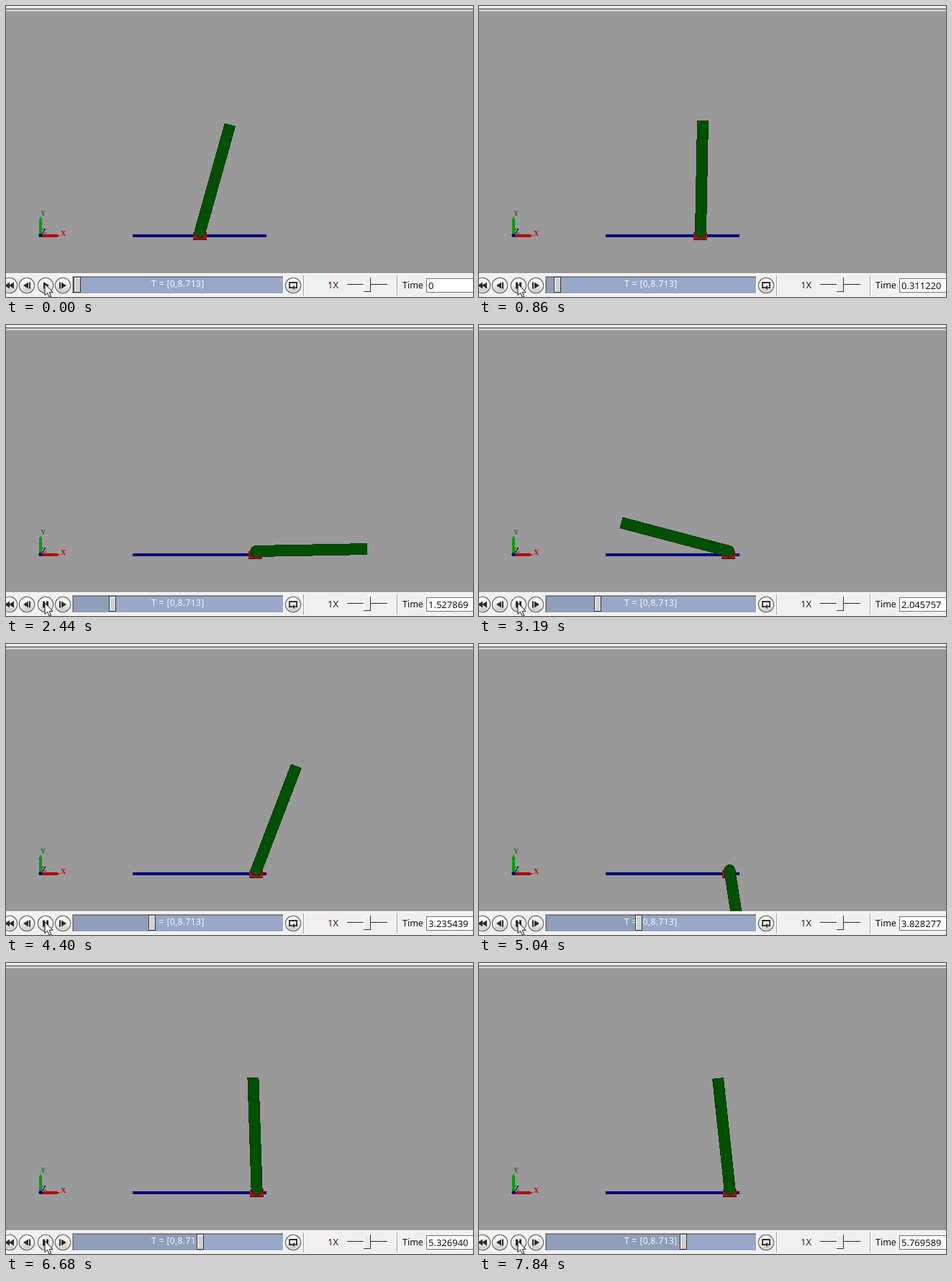
These frames come from a looping animation (649 by 404 pixels, 8 s). An HTML page:

```html
<!DOCTYPE html>
<html lang="en">
<head>
<meta charset="utf-8">
<title>Cart and pendulum</title>
<style>
  html, body { margin: 0; width: 100%; height: 100%; overflow: hidden; background: #999; }
  svg { display: block; width: 100vw; height: 100vh; }
  text { font-family: "Noto Sans", sans-serif; white-space: pre; }
  .axis text { font: bold 10px "Liberation Serif", serif; }
  .crisp { shape-rendering: crispEdges; }
</style>
</head>
<body>
<svg viewBox="0 0 649 404">
  <defs>
    <linearGradient id="knob" x1="0" y1="0" x2="0" y2="1">
      <stop offset="0" stop-color="#fff"/>
      <stop offset=".5" stop-color="#eee"/>
      <stop offset="1" stop-color="#bdbdbd"/>
    </linearGradient>
    <g id="button">
      <circle r="10.6" fill="url(#knob)" stroke="#6c6c6c" stroke-width="1.3"/>
      <circle r="9.3" fill="none" stroke="#fff" stroke-opacity=".7"/>
    </g>
    <path id="tri" d="M-4 0L3 -4.5V4.5Z"/>
  </defs>

  <rect width="649" height="404" fill="#999"/>
  <g class="crisp">
    <rect width="649" height="3" fill="#f0f0f0"/>
    <rect y="3" width="649" height="1" fill="#808080"/>
    <rect y="4" width="649" height="2" fill="#a4a4a4"/>
    <rect y="6" width="649" height="1" fill="#fff"/>
  </g>

  <g class="axis">
    <path d="M48 318V297" stroke="#00a000" stroke-width="4"/>
    <path d="M45.5 298L48 292L50.5 298Z" fill="#00a000"/>
    <path d="M48 319H70" stroke="#b40000" stroke-width="4"/>
    <path d="M69 316.5L75 319L69 321.5Z" fill="#b40000"/>
    <circle cx="48" cy="318.5" r="2.6" fill="#000070"/>
    <text x="48" y="291" fill="#3c643c">Y</text>
    <text x="76" y="319" fill="#d00000">X</text>
    <text x="49.5" y="316" fill="#202060">Z</text>
  </g>

  <rect class="crisp" x="176" y="317" width="186" height="4" fill="#00007c"/>
  <g id="cart" class="crisp">
    <rect x="-10" y="314" width="19" height="11" fill="#a01212"/>
    <path d="M-10 324.5H9M-8 316Q0 328 8 316" fill="none" stroke="#3c0808"/>
    <path id="rod" d="M-7.5 0V-154.5H7.5V0A7.5 7.5 0 0 1 -7.5 0Z" fill="#005000" stroke="#033a03"/>
  </g>

  <g class="crisp">
    <rect y="371" width="649" height="33" fill="#f0f0f0"/>
    <rect y="371" width="649" height="1" fill="#fff"/>
    <rect x="92" y="375" width="294" height="25" fill="#fff"/>
    <path d="M92.5 399V375.5H385" fill="none" stroke="#a0a0a0"/>
    <rect x="93" y="376" width="292" height="23" fill="#696969"/>
    <rect x="94" y="377" width="291" height="22" fill="#99a8c9"/>
    <rect id="trail" x="94" y="377" width="0" height="22" fill="#8f9fb9"/>
  </g>
  <text x="202" y="390" font-size="12" letter-spacing=".4" fill="#f4f6fb">T = [0,8.713]</text>
  <g id="thumb" class="crisp">
    <rect x="94" y="376" width="10" height="22" fill="#333"/>
    <rect x="95" y="377" width="8" height="20" fill="#fff"/>
    <rect x="96" y="378" width="7" height="19" fill="#d0d0d0"/>
  </g>

  <g fill="#26301f">
    <g transform="translate(5 388)"><use href="#button"/><use href="#tri" x="3"/><use href="#tri" x="-3"/><path d="M-8 -4.5h2v9h-2z"/></g>
    <g transform="translate(29 388)"><use href="#button"/><use href="#tri" x="-1"/><path d="M3 -4.5h2v9h-2z"/></g>
    <g transform="translate(55 388)"><use href="#button"/>
      <path id="play" d="M-3 -5L5 0L-3 5Z"/>
      <path id="pause" d="M-4 -4.5h3v9h-3zM1 -4.5h3v9h-3z"/>
    </g>
    <g transform="translate(79 388)"><use href="#button"/><use href="#tri" transform="translate(1) scale(-1 1)"/><path d="M-5 -4.5h2v9h-2z"/></g>
    <g transform="translate(399 388)"><use href="#button"/><path d="M-1.5 3H-5V-4H5V3H2.5" fill="none" stroke="#26301f" stroke-width="1.8"/><path d="M-2 3L2 0V6Z"/></g>
  </g>

  <g class="crisp">
    <path d="M413.5 374V402M543.5 374V402" stroke="#a0a0a0"/>
    <path d="M414.5 374V402M544.5 374V402" stroke="#fff"/>
    <path d="M474 386.5H530" stroke="#222"/>
    <path d="M474 387.5H530" stroke="#fff"/>
    <rect x="497" y="377" width="10" height="20" fill="#333"/>
    <rect x="497" y="377" width="9" height="19" fill="#fff"/>
    <rect x="498" y="378" width="8" height="18" fill="#ececec"/>
    <rect x="584" y="378" width="65" height="20" fill="#707070"/>
    <rect x="585" y="379" width="64" height="18" fill="#fff"/>
  </g>
  <text x="447" y="392" font-size="13" fill="#5c1018">1<tspan fill="#222">X</tspan></text>
  <text x="551" y="392" font-size="12.5" fill="#111">Time</text>
  <text id="time" x="587" y="393" font-size="13" fill="#111">0</text>
  <path d="M54 386V401.5L57.5 398.2L60.2 404H62.8L60.3 397.3H65Z" fill="#fff" stroke="#111"/>
</svg>
<script>
const LOOP = 8000;
const PLAY = 390;    // ms, playback begins
const W = 3.83;      // natural rate of the rod
const HIT = 0.44;    // s, the cart reaches the end of the rail
const $ = id => document.getElementById(id);

// playback speed varies: wall clock (ms) to simulation time (s)
const clock = [
  [PLAY, 0], [1470, 0.713625], [2440, 1.527179], [3190, 2.044774],
  [4400, 3.234513], [5710, 4.447977], [7170, 5.769589]
];

function simTime(ms) {
  if (ms <= PLAY) return 0;
  const i = clock.findIndex(key => key[0] > ms);
  if (i < 0) return clock.at(-1)[1];
  const [m0, s0] = clock[i - 1], [m1, s1] = clock[i];
  return s0 + (s1 - s0) * (ms - m0) / (m1 - m0);
}

// angle from upright, clockwise: two passes over the top, then a turn just short of it
function angle(t) {
  if (t < HIT) return 0.274 - 0.509 * (t / HIT) ** 2;
  if (t < 1.763) return 4 * Math.atan(0.0407 * Math.sinh(W * (t - 0.744)));
  if (t < 3.851) return 4 * Math.atan(0.037 * Math.sinh(W * (t - 2.807)));
  return -4 * Math.atan(0.00823 * Math.cosh(W * (t - 5.2875)));
}

function cartX(t) {
  return t < HIT ? 269.5 + 77 * (t / HIT) ** 2 : 346.5 + 0.45 * Math.min(t, 4.6);
}

function draw(ms) {
  const t = simTime(ms), running = ms >= PLAY, slide = Math.round(32.1 * t);
  $("cart").setAttribute("transform", `translate(${cartX(t).toFixed(2)} 0)`);
  $("rod").setAttribute("transform", `translate(0 314) rotate(${(angle(t) * 180 / Math.PI).toFixed(2)})`);
  $("thumb").setAttribute("transform", `translate(${slide} 0)`);
  $("trail").setAttribute("width", slide);
  $("time").textContent = t ? t.toFixed(6) : "0";
  $("play").style.display = running ? "none" : "";
  $("pause").style.display = running ? "" : "none";
}

const start = performance.now();
function tick() {
  draw((performance.now() - start) % LOOP);
  requestAnimationFrame(tick);
}
tick();
</script>
</body>
</html>
```
